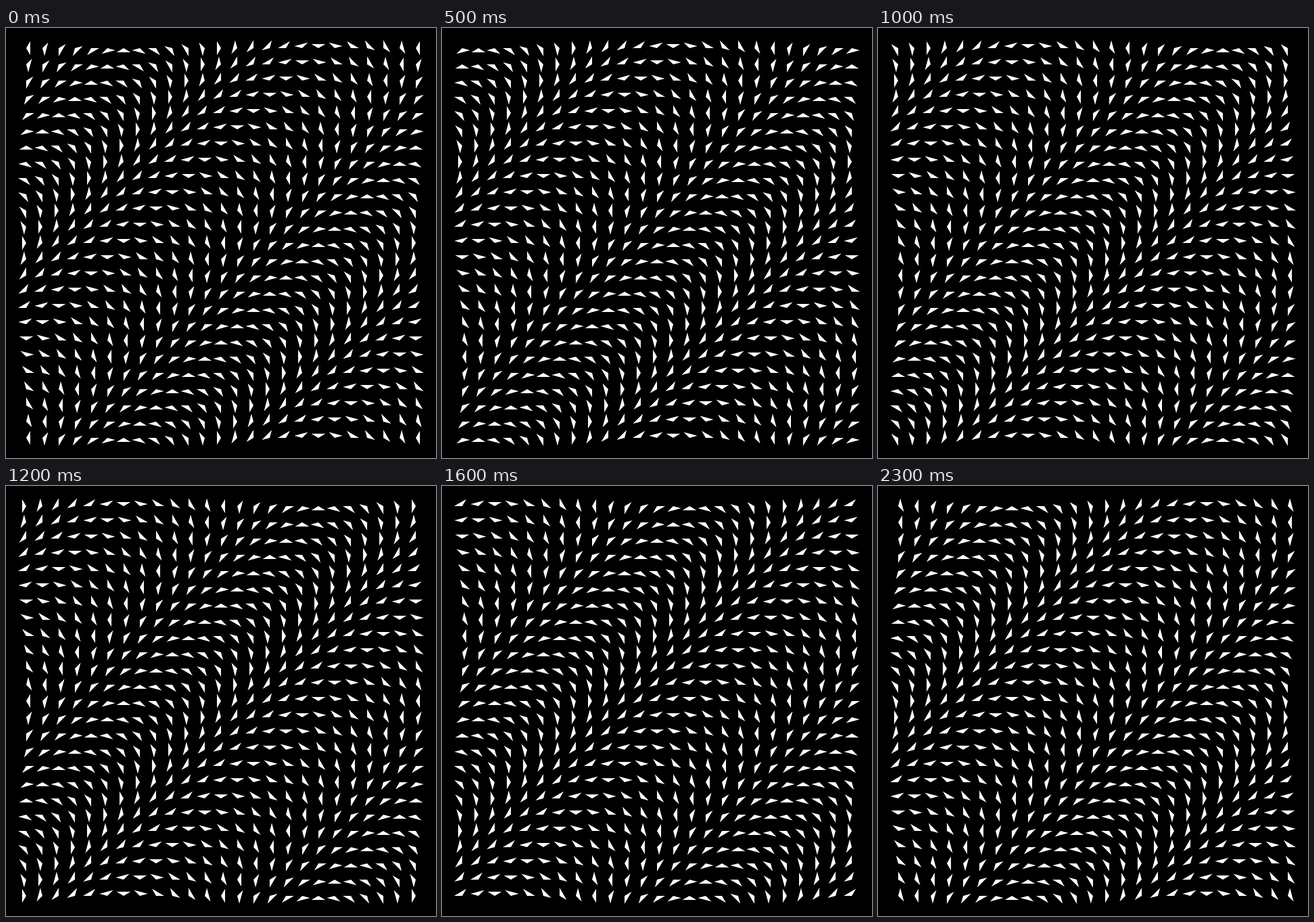
Recreate the animation shown at these times as an HTML page. Size 748 by 748 pixels, loop 2.4 s.

```html
<!DOCTYPE html>
<html lang="en">
<head>
<meta charset="utf-8">
<title>Rotating triangles</title>
<style>
  html, body { margin: 0; width: 100%; height: 100%; overflow: hidden; background: #000; }
  svg { display: block; width: 748px; height: 748px; }
</style>
</head>
<body>
<svg viewBox="0 0 748 748"><rect width="748" height="748"/><path id="field" fill="#fff"/></svg>
<script>
const COUNT = 25;
const MARGIN = 21;
const CELL = (748 - 2 * MARGIN) / COUNT;
const STEPS = 24;
const STEP_MS = 100;
const field = document.getElementById('field');

// Each triangle pivots on its 120° apex at the cell centre.
function triangle(x, y, angle) {
  const corner = a => `${(x + CELL / 2 * Math.cos(a)).toFixed(2)} ${(y + CELL / 2 * Math.sin(a)).toFixed(2)}`;
  return `M${x.toFixed(2)} ${y.toFixed(2)}L${corner(angle - Math.PI / 3)}L${corner(angle + Math.PI / 3)}Z`;
}

function draw(step) {
  const center = i => MARGIN + (i + 0.5) * CELL;
  let d = '';
  for (let row = 0; row < COUNT; row++) {
    for (let col = 0; col < COUNT; col++) {
      const angle = (col + row + step) % STEPS * 2 * Math.PI / STEPS;
      d += triangle(center(col), center(row), angle);
    }
  }
  field.setAttribute('d', d);
}

const start = performance.now();
let shown = -1;

function tick() {
  const step = Math.floor((performance.now() - start) / STEP_MS) % STEPS;
  if (step !== shown) draw(shown = step);
  requestAnimationFrame(tick);
}
tick();
</script>
</body>
</html>
```
